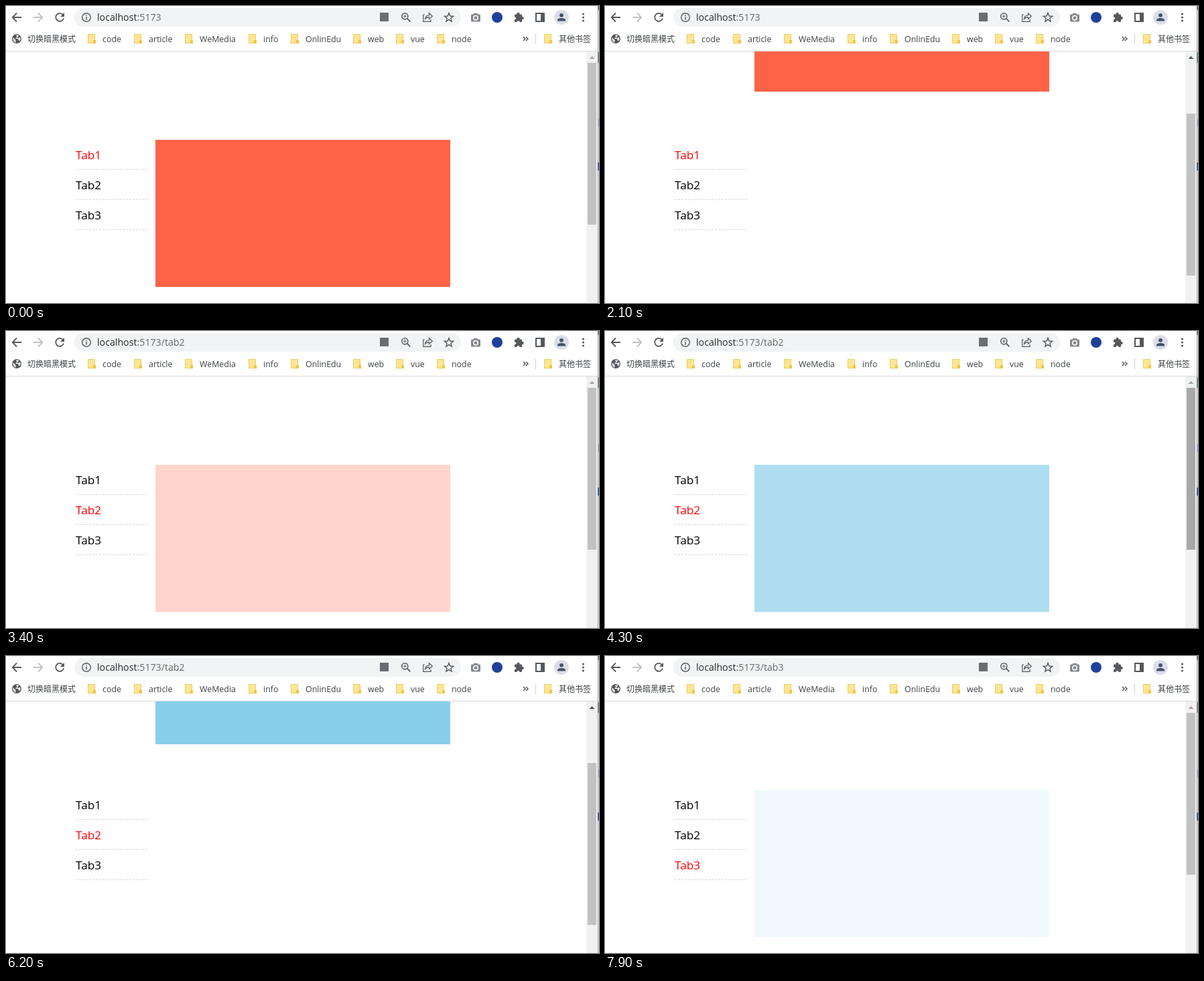
An HTML page with a canvas that plays this animation: 885 by 444 pixels, repeating every 8 s.

```html
<!DOCTYPE html>
<html lang="zh">
<head>
<meta charset="utf-8">
<title>Tabs</title>
<style>
html, body { margin: 0; width: 100%; height: 100%; overflow: hidden; background: #fff; }
canvas, svg { position: absolute; left: 0; top: 0; display: block; }
text { font-family: "Open Sans", "Noto Sans", "Noto Sans CJK SC", "Noto Sans CJK", sans-serif; white-space: pre; }
</style>
</head>
<body>
<canvas id="stage" width="885" height="444"></canvas>
<svg id="labels" width="885" height="444"></svg>
<script>
const W = 885, H = 444, LOOP = 8000, PAGE_TOP = 68;
const INK = '#55585c', TOMATO = '255,99,71', SKY = '135,206,235';
const ctx = document.getElementById('stage').getContext('2d');
const labels = document.getElementById('labels');

function label(str, x, y, size, color) {
  const el = document.createElementNS('http://www.w3.org/2000/svg', 'text');
  el.setAttribute('x', x);
  el.setAttribute('y', y);
  el.setAttribute('font-size', size);
  el.setAttribute('fill', color);
  el.textContent = str;
  labels.appendChild(el);
  return el;
}

function rect(c, x, y, w, h, color) {
  c.fillStyle = color;
  c.fillRect(x, y, w, h);
}

function disc(c, x, y, r, color) {
  c.fillStyle = color;
  c.beginPath();
  c.arc(x, y, r, 0, Math.PI * 2);
  c.fill();
}

function ring(c, x, y, r, color, width) {
  c.strokeStyle = color;
  c.lineWidth = width;
  c.beginPath();
  c.arc(x, y, r, 0, Math.PI * 2);
  c.stroke();
}

function stroke(c, d, color = INK, width = 1.5) {
  c.strokeStyle = color;
  c.lineWidth = width;
  c.stroke(new Path2D(d));
}

function fill(c, d, color = INK) {
  c.fillStyle = color;
  c.fill(new Path2D(d));
}

function folder(c, x) {
  rect(c, x, 42, 11, 14, '#ffe694');
  c.strokeStyle = '#eccb5c';
  c.lineWidth = 1;
  c.strokeRect(x + .5, 42.5, 10, 13);
  fill(c, `M${x + 8} 56V51H${x + 12}V56Z`, '#f0c544');
}

function star(c, x, y, r) {
  c.beginPath();
  for (let i = 0; i < 10; i++) {
    const a = -Math.PI / 2 + i * Math.PI / 5, q = i % 2 ? r * .43 : r;
    c.lineTo(x + q * Math.cos(a), y + q * Math.sin(a));
  }
  c.closePath();
  c.strokeStyle = INK;
  c.lineWidth = 1.4;
  c.stroke();
}

const marks = [['code', 144], ['article', 213], ['WeMedia', 289], ['info', 384],
  ['OnlinEdu', 447], ['web', 540], ['vue', 604], ['node', 665]];

function drawToolbar(c) {
  rect(c, 0, 0, W, 67, '#fff');
  rect(c, 0, 67, 883, 1, '#d8dadd');
  c.fillStyle = '#f1f3f4';
  c.beginPath();
  c.roundRect(102, 3, 577, 28, 14);
  c.fill();

  // navigation
  stroke(c, 'M23 17H10M16 10.5L9.7 17L16 23.5', INK, 1.8);
  stroke(c, 'M41 17H54M48 10.5L54.3 17L48 23.5', '#bfc1c4', 1.8);
  stroke(c, 'M85 13.2A6 6 0 1 0 86 18.5', INK, 1.8);
  fill(c, 'M87 10V16H81Z');
  ring(c, 120, 17, 6.3, INK, 1.4);
  rect(c, 119.3, 16, 1.5, 4.5, INK);
  rect(c, 119.3, 13.3, 1.5, 1.5, INK);

  // address bar actions
  rect(c, 558, 10, 13, 13, '#6a6d71');
  ring(c, 595.3, 15.3, 4.6, INK, 1.5);
  stroke(c, 'M598.7 18.7L603.3 23.3', INK, 1.8);
  stroke(c, 'M593 15.3H597.6M595.3 13V17.6', INK, 1);
  stroke(c, 'M625 13H622.7V23.3H634V20M625.5 19.5C626 15.5 628.5 13.8 631.5 13.8V10.7L636.3 15.3L631.5 19.5V16.6C629 16.6 627 17.5 625.5 19.5Z', INK, 1.2);
  star(c, 661, 17.4, 7);

  // extensions
  c.fillStyle = '#85888c';
  c.beginPath();
  c.roundRect(694, 12.5, 14, 11, 1.5);
  c.fill();
  rect(c, 698, 10.8, 6, 2.5, '#85888c');
  ring(c, 701, 17.8, 3.2, '#fff', 1.5);
  disc(c, 733, 17, 8, '#1d419a');
  c.fillStyle = INK;
  c.beginPath();
  c.roundRect(759, 12.5, 11, 11.5, 1.3);
  c.fill();
  disc(c, 764.5, 12, 2.2, INK);
  disc(c, 770.5, 18, 2.2, INK);
  disc(c, 759.3, 18.3, 1.9, '#fff');
  disc(c, 764.5, 23.8, 1.9, '#fff');
  c.strokeStyle = INK;
  c.lineWidth = 2;
  c.strokeRect(791, 11, 12, 12);
  rect(c, 798, 11, 6, 12, INK);
  disc(c, 829, 17, 11, '#dbdee9');
  disc(c, 829, 13.8, 2.9, '#44526a');
  fill(c, 'M823 22.5V21C823 18.7 827 18 829 18S835 18.7 835 21V22.5Z', '#44526a');
  for (const y of [12, 17, 22]) disc(c, 861.5, y, 1.6, INK);

  // bookmarks
  disc(c, 16, 49, 7, '#53565a');
  fill(c, 'M10.5 47L14.5 51V54.5C12 54 10 51.5 10.5 47ZM15 43.5H19.5L18 46L15.5 47L14 49H18L19 52L21 51.5C21.8 50 22 48 21 46.5L18.5 48L16.5 47Z', '#eceded');
  for (const [, x] of marks) folder(c, x - 22);
  folder(c, 803);
  stroke(c, 'M772 46L775 49L772 52M776 46L779 49L776 52', INK, 1.5);
  rect(c, 790, 41, 1, 16, '#cfd1d4');
}

function drawEdge(c) {
  rect(c, 883, 0, 1, H, '#a3a4a2');
  rect(c, 884, 0, 1, H, '#e9e9e7');
  for (const [y, h, color] of [[0, 6, '#777'], [69, 16, '#6f9183'], [169, 12, '#a5a6c4'], [234, 12, '#405f9c']])
    rect(c, 883, y, 2, h, color);
}

// static chrome is painted once and reused
const chrome = document.createElement('canvas');
chrome.width = W;
chrome.height = H;
const cc = chrome.getContext('2d');
drawToolbar(cc);
drawEdge(cc);

label('localhost', 136, 22, 14.2, '#26282b');
const port = label(':5173', 195.5, 22, 14.2, '#666a6f');
label('切换暗黑模式', 32, 54, 12, '#3c4043');
label('其他书签', 825, 54, 12, '#3c4043');
for (const [name, x] of marks) label(name, x, 54, 12.4, '#3c4043');
const tabs = [1, 2, 3].map(n => label('Tab' + n, 104, 184 + 45 * n, 17.2, '#000'));

const clamp = (v, lo = 0, hi = 1) => Math.min(hi, Math.max(lo, v));
const ramp = (t, a, b) => clamp((t - a) / (b - a));

// CSS "ease": cubic-bezier(.25, .1, .25, 1)
function ease(x) {
  if (x <= 0 || x >= 1) return clamp(x);
  const bez = (s, p, q) => 3 * s * (1 - s) ** 2 * p + 3 * s * s * (1 - s) * q + s ** 3;
  let lo = 0, hi = 1;
  for (let i = 0; i < 24; i++) {
    const mid = (lo + hi) / 2;
    if (bez(mid, .25, .25) < x) lo = mid; else hi = mid;
  }
  return bez(lo, .1, 1);
}

// the screen refreshes every 100 ms, except during these pauses
const holds = [[3500, 3700], [3700, 4100], [4300, 4500], [4500, 4800], [7700, 7900]];

function screenTime(ms) {
  const t = Math.floor(ms / 100) * 100;
  const hold = holds.find(([a, b]) => t >= a && t < b);
  return hold ? hold[0] : t;
}

function scrollAt(t) {
  if (t < 3000) return 292 * ramp(t, 700, 2000);
  if (t >= 7400) return 0;
  return t < 5100 ? 69 * ramp(t, 4800, 5100) : 69 + 219 * ramp(t, 5100, 6100);
}

function thumbColor(t) {
  const within = (a, b) => t >= a && t < b;
  if (within(700, 2100) || within(4800, 6200)) return '#787878';
  if (within(400, 700) || within(4200, 4800)) return '#a8a8a8';
  return '#c1c1c1';
}

function panel(t) {
  if (t < 3910) return [TOMATO, 1 - ease((t - 2965) / 1000)];
  if (t < 7000) return [SKY, ease((t - 3910) / 1000)];
  return [SKY, 1 - ease((t - 7320) / 1000)];
}

function render(ms) {
  const t = screenTime(ms), scroll = Math.round(scrollAt(t));
  const active = t < 3000 ? 0 : t < 7400 ? 1 : 2;
  const [rgb, alpha] = panel(t);

  rect(ctx, 0, 0, W, H, '#fff');
  const top = Math.max(PAGE_TOP, 200 - scroll);
  rect(ctx, 223, top, 440, 420 - scroll - top, `rgba(${rgb},${alpha})`);

  ctx.setLineDash([3, 2]);
  for (const y of [244.5, 289.5, 334.5]) stroke(ctx, `M104 ${y}H214`, '#d5d5d5', 1);
  ctx.setLineDash([]);

  rect(ctx, 866, PAGE_TOP, 17, H - PAGE_TOP, '#f1f1f1');
  fill(ctx, 'M870.5 79L874.5 75L878.5 79Z', scroll ? '#505050' : '#a3a3a3');
  rect(ctx, 868, 85 + Math.round(scroll * .26), 13, 242, thumbColor(t));
  ctx.drawImage(chrome, 0, 0);

  port.textContent = ':5173' + ['', '/tab2', '/tab3'][active];
  tabs.forEach((tab, i) => tab.setAttribute('fill', i === active ? '#f00' : '#000'));
}

const start = performance.now();
function tick() {
  render((performance.now() - start) % LOOP);
  requestAnimationFrame(tick);
}
tick();
</script>
</body>
</html>
```
